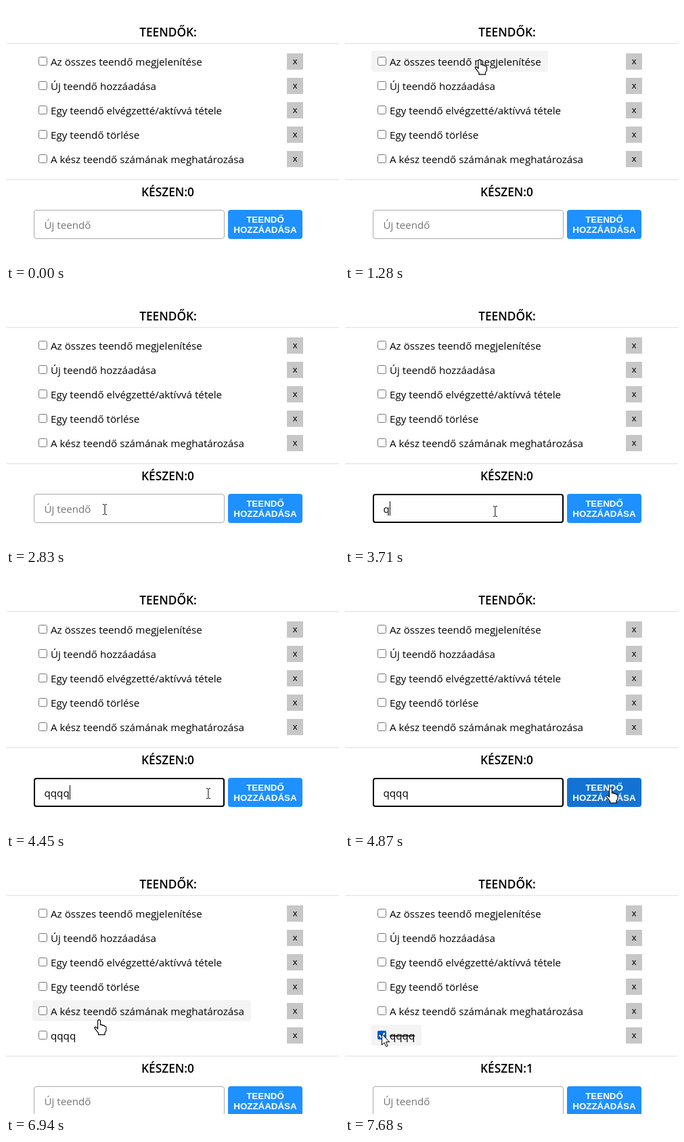
An HTML page for the animation above (8000 ms loop, 492 by 378 pixels).

```html
<!DOCTYPE html>
<html lang="hu">
<head>
<meta charset="utf-8">
<title>Teendők</title>
<style>
  html, body { margin: 0; width: 100%; height: 100%; overflow: hidden; background: #fff; }
  svg { display: block; width: 492px; height: 378px; }
  text { font: 15.2px "Open Sans", sans-serif; white-space: pre; }
  .title { font-size: 17.3px; font-weight: 600; text-anchor: middle; }
  .button, .remove { font: 13.33px "Liberation Sans", Arial, sans-serif; text-anchor: middle; }
  .button { font-weight: bold; fill: #fff; }
  .done { text-decoration: line-through; }
</style>
</head>
<body>
<svg id="stage" viewBox="0 0 492 378"></svg>
<script>
const LOOP = 8000;
const TASKS = [
  'Az összes teendő megjelenítése',
  'Új teendő hozzáadása',
  'Egy teendő elvégzetté/aktívvá tétele',
  'Egy teendő törlése',
  'A kész teendő számának meghatározása'
];
const TYPED = 'qqqq';
const FIRST_KEY = 3640, KEY_GAP = 203;
const SHOW = 460, FOCUS = 3030, PRESS = 5130, ADD = 5270, CHECK = 7610;
const ROW = 36;

const linear = f => f;
const easeOut = f => 1 - (1 - f) ** 2;
const ENTRY = { x: 421, y: 345 };
// Each move starts where the previous one ended; lift bends it upwards.
const MOVES = [
  { from: SHOW, to: 1210, x: 199, y: 79, ease: easeOut },   // first task
  { from: 1280, to: 2090, x: 160, y: 225 },                 // last task
  { from: 2090, to: 2830, x: 146, y: 324, ease: easeOut },  // input
  { from: 3370, to: 4120, x: 254, y: 328, ease: easeOut },  // aside while typing
  { from: 4250, to: 4870, x: 392.5, y: 316 },               // add button
  { from: 6330, to: 7140, x: 54.5, y: 260, lift: 50 }       // new checkbox
];

const stage = document.getElementById('stage');
const pen = document.createElement('canvas').getContext('2d');

const textWidth = s => {
  pen.font = '15.2px "Open Sans", sans-serif';
  return pen.measureText(s).width;
};
const rect = (x, y, w, h, fill, extra = '') =>
  `<rect x="${x}" y="${y}" width="${w}" height="${h}" fill="${fill}" ${extra}/>`;
const label = (x, y, s, type = '', fill = '#000') =>
  `<text x="${x}" y="${y}" class="${type}" fill="${fill}">${s}</text>`;
const inside = (p, x, y, w, h) => p.x >= x && p.x < x + w && p.y >= y && p.y < y + h;

function pointerAt(t) {
  let { x, y } = ENTRY;
  for (const { from, to, ease = linear, lift = 0, ...end } of MOVES) {
    const f = ease(Math.min(1, Math.max(0, (t - from) / (to - from))));
    x += (end.x - x) * f;
    y += (end.y - y) * f - lift * Math.sin(Math.PI * f);
  }
  return { x, y, shape: 'arrow' };
}

function taskRow(task, i, pointer, done) {
  const y = 66 + ROW * i;
  const width = textWidth(task) + 37;
  const hover = inside(pointer, 39, y, width, 31);
  if (hover && pointer.x >= 66) pointer.shape = 'hand';
  const box = done
    ? rect(48, y + 9, 13, 13, '#005cc8', 'rx="2"') +
      `<path d="M50.5 ${y + 15.5}l3 3 5-6" fill="none" stroke="#fff" stroke-width="2"/>`
    : rect(48.5, y + 9.5, 12, 12, '#fff', 'rx="2" stroke="#767676"');
  return (hover ? rect(39, y, width, 31, '#f4f4f4', 'rx="3"') : '') +
    box + label(66, y + 22, task, done ? 'done' : '') +
    rect(415, y + 4, 24, 24, '#c7c7c7') + label(427, y + 20, 'x', 'remove');
}

function form(t, y, pointer) {
  const focused = t >= FOCUS && t < PRESS;
  const keys = Math.max(0, Math.min(TYPED.length, Math.floor((t - FIRST_KEY) / KEY_GAP) + 1));
  const value = t < ADD ? TYPED.slice(0, keys) : '';
  const lastInput = keys ? FIRST_KEY + (keys - 1) * KEY_GAP : FOCUS;
  const caretOn = focused && (t - lastInput) % 1000 < 500;
  const overButton = inside(pointer, 328, y, 110, 43);
  if (overButton) pointer.shape = 'hand';
  if (inside(pointer, 41, y, 282, 43)) pointer.shape = 'beam';
  return (focused
      ? rect(42, y + 1, 280, 41, '#fff', 'rx="3" stroke="#000" stroke-width="2"')
      : rect(41.5, y + 0.5, 281, 42, '#fff', 'rx="3.5" stroke="#aaa"')) +
    label(56.5, y + 28, value || 'Új teendő', '', value ? '#000' : '#757575') +
    (caretOn ? rect(Math.round(56.5 + textWidth(value)), y + 11, 1, 21, '#000') : '') +
    rect(328, y, 110, 43, overButton ? '#1473d2' : '#1e90ff', 'rx="4"') +
    label(383, y + 19, 'TEENDŐ', 'button') +
    label(383, y + 34, 'HOZZÁADÁSA', 'button');
}

const POINTERS = {
  arrow: '<path d="M0 0V16L3.7 12.6 6.3 18.5 8.6 17.5 6.1 11.6H11.3Z" fill="#fff" stroke="#000"/>',
  hand: `<path d="M-2 2Q-2 0 0 0T2 2V7.5Q4.5 6.5 5 8.5 7.5 7.5 8 9.5 10.5 9 10.5 11.5V15
    Q10.5 17 8.5 19V22H-1V19.5L-6.5 12.5Q-7 10.5-5 10.5L-2 13Z" fill="#fff" stroke="#000" stroke-width="1.2"/>`,
  beam: '<path d="M-3-7.5H-1L0-6.5 1-7.5H3M0-6.5V6.5M-3 7.5H-1L0 6.5 1 7.5H3" fill="none" stroke="#000"/>'
};

function render(t) {
  const pointer = pointerAt(t);
  const tasks = t < ADD ? TASKS : [...TASKS, TYPED];
  const checked = t >= CHECK;
  const shift = ROW * (tasks.length - TASKS.length);
  stage.innerHTML =
    label(239.5, 45, 'TEENDŐK:', 'title') +
    rect(0, 55, 492, 1, '#dfdfdf') +
    tasks.map((task, i) => taskRow(task, i, pointer, checked && i === TASKS.length)).join('') +
    rect(0, 256 + shift, 492, 1, '#dfdfdf') +
    label(239, 281 + shift, 'KÉSZEN:' + (checked ? 1 : 0), 'title') +
    form(t, 301 + shift, pointer) +
    (t >= SHOW ? `<g transform="translate(${pointer.x} ${pointer.y})">${POINTERS[pointer.shape]}</g>` : '');
}

const start = performance.now();
function tick() {
  render((performance.now() - start) % LOOP);
  requestAnimationFrame(tick);
}
tick();
</script>
</body>
</html>
```
